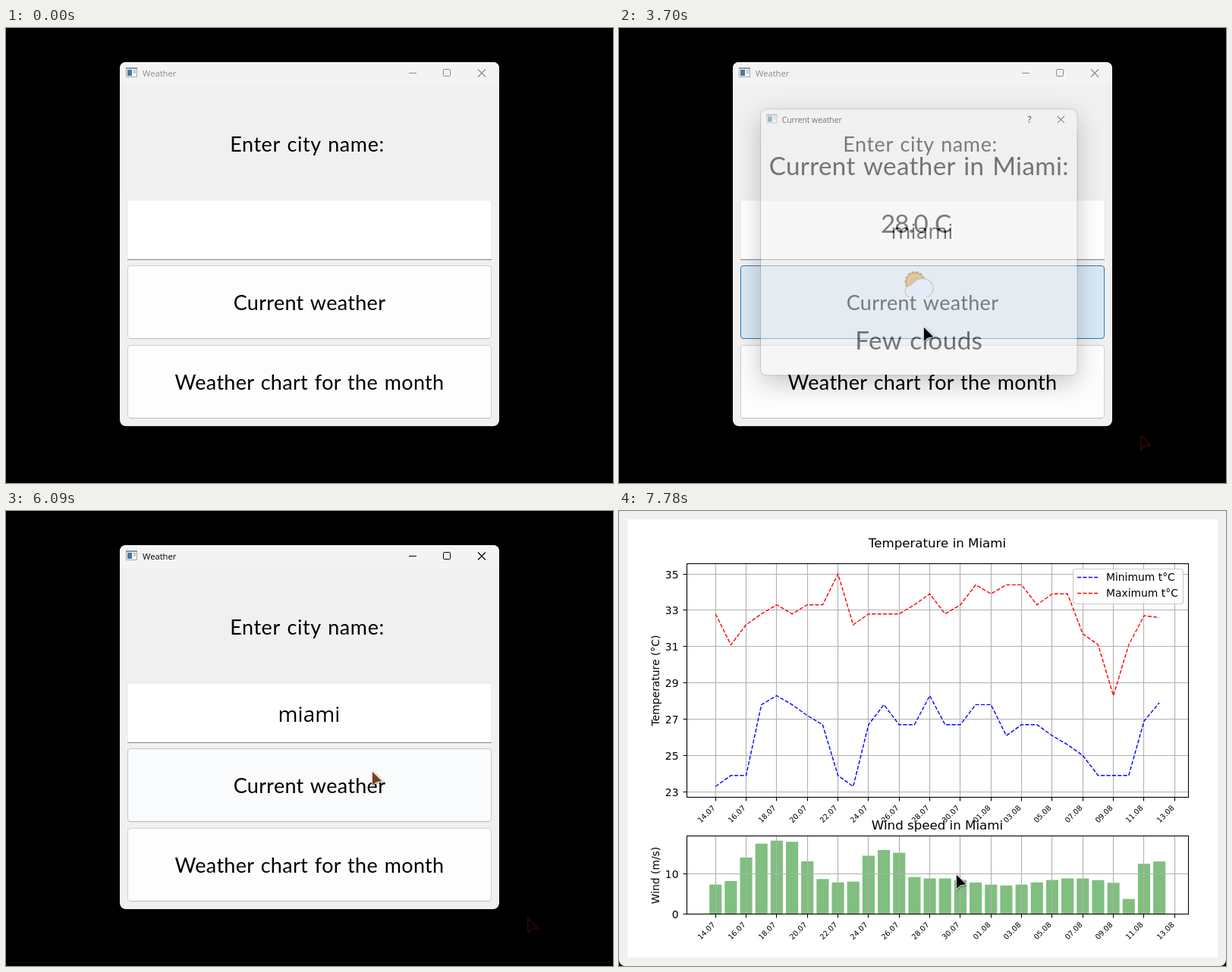
An HTML page for the animation above (8 s loop, 800x600 px).

```html
<!DOCTYPE html>
<html lang="en">
<head>
<meta charset="utf-8">
<title>Weather</title>
<style>
  html, body { margin: 0; width: 100%; height: 100%; overflow: hidden; background: #000; }
  svg { display: block; width: 100%; height: 100%; }
  text { white-space: pre; }
  .ui { font: 11.2px "Open Sans", "Noto Sans", sans-serif; fill: currentColor; }
  .help { font-size: 13px; font-weight: 600; }
  .big { font: 27px Lato, sans-serif; letter-spacing: .011em; word-spacing: .059em; text-anchor: middle; }
  .label { letter-spacing: .022em; }
  .huge { font-size: 36px; }
  .digits { letter-spacing: -.03em; }
  .typed { font: 28px "Open Sans", "Noto Sans", sans-serif; text-anchor: middle; }
  .plot text { font: 13.89px "DejaVu Sans", sans-serif; }
  .plot .head { font-size: 16.67px; text-anchor: middle; }
  .plot .day { font-size: 9.72px; text-anchor: middle; }
  .mid { text-anchor: middle; }
  .end { text-anchor: end; }
  .shadow { filter: drop-shadow(0 12px 18px rgba(0, 0, 0, .42)); }
  #cursor { filter: drop-shadow(1px 1.5px 1.5px rgba(0, 0, 0, .4)); }
</style>
</head>
<body>
<svg id="stage" viewBox="0 0 800 600"></svg>
<script>
const LOOP = 8000, STEP = 70;

// ---------- drawing helpers ----------
const rect = (x, y, w, h, fill, more = '') =>
  `<rect x="${x}" y="${y}" width="${w}" height="${h}" fill="${fill}" ${more}/>`;
const path = (d, stroke, more = '') => `<path d="${d}" fill="none" stroke="${stroke}" ${more}/>`;
const text = (x, y, cls, str, more = '') => `<text x="${x}" y="${y}" class="${cls}" ${more}>${str}</text>`;

function frame(x, y, w, h, title, id, dialog) {
  const r = x + w, cy = y + 14.5;
  const border = dialog
    ? rect(x - .5, y - .5, w + 1, h + 1, 'none', 'rx="8.5" stroke="#000" stroke-opacity=".3"') +
      `<path id="closeBg" d="M${r - 45} ${y}h37a8 8 0 0 1 8 8v21h-45z" fill="#c42b1c"/>` : '';
  const extra = dialog
    ? text(r - 68, y + 19, 'ui mid help', '?')
    : path(`M${r - 119} ${cy}h10`, 'currentColor') +
      rect(r - 73.5, y + 9.5, 9, 9, 'none', 'stroke="currentColor" rx="1"');
  return rect(x, y, w, h, '#f0f0f0', `rx="8" ${dialog ? 'class="shadow"' : ''}`) +
    `<path d="M${x} ${y + 30}v-22a8 8 0 0 1 8-8h${w - 16}a8 8 0 0 1 8 8v22z" fill="#f3f3f3"/>` +
    border + `<g id="${id}Bar">` +
    rect(x + 8.5, y + 7.5, 14, 12, '#f4f6f8', 'stroke="#a3abb2"') +
    rect(x + 8, y + 7, 15, 2, '#8d979f') +
    rect(x + 10, y + 10, 6, 8, '#4a7a9c') + rect(x + 18, y + 10, 3, 5, '#c3c9ce') +
    text(x + 30, y + 19, 'ui', title) + extra +
    path(`M${r - 28} ${cy - 5}l10 10m0 -10l-10 10`, 'currentColor', `id="${id}X" stroke-width="1.1"`) + '</g>';
}

const button = (id, y, label) =>
  rect(160.5, y + .5, 479, 96, '#fdfdfd', `id="${id}" rx="3.5"`) +
  path(`M163 ${y + 96.5}H637`, '#bdbdbd', `id="${id}Edge"`) +
  text(400, y + 58.5, 'big', label);

const mainWindow = () =>
  frame(150, 45, 500, 480, 'Weather', 'main') +
  text(397, 163, 'big label', 'Enter city name:') +
  rect(160, 227, 480, 78, '#fff', 'stroke="#e4e4e4" stroke-width=".8"') +
  path('M160 305.5H640', '#868686') +
  rect(159, 304.4, 482, 1.6, '#2a6496', 'id="focus"') +
  text(399.5, 278, 'typed', '', 'id="typed"') +
  button('now', 313, 'Current weather') +
  button('month', 418, 'Weather chart for the month');

function weatherIcon() {
  let rays = '';
  for (let a = 0; a < 14; a++) {
    rays += `<circle cx="12" r="2.9" transform="translate(394.5 341.5) rotate(${a * 360 / 14})"/>`;
  }
  const cloud = 'M386 363.5C379 361 378 350 385.5 347.5C389 347 390 345 393 342' +
    'C398 337 407 336 413 339C421 343 423 355 416 361Q414 363 411 363.5';
  return `<g fill="#b97a33">${rays}</g><circle cx="394.5" cy="341.5" r="12" fill="#e6a340"/>` +
    path('M385 345a10 10 0 0 1 17 -9', '#f0b95f', 'stroke-width="2"') +
    `<path d="${cloud}" fill="#f1eff8" stroke="#a3a1a6" stroke-width="1.1"/>`;
}

const dialogWindow = () =>
  frame(174, 95, 452, 380, 'Current weather', 'dlg', true) +
  text(400, 189.5, 'big huge', 'Current weather in Miami:') +
  text(395.5, 272, 'big huge digits', '28.0 C') + weatherIcon() +
  text(400, 439, 'big huge', 'Few clouds');

// ---------- chart ----------
// One value per day
const high = [32.8, 31.1, 32.2, 32.8, 33.3, 32.8, 33.3, 33.3, 35, 32.2, 32.8, 32.8, 32.8, 33.3, 33.9,
  32.8, 33.3, 34.4, 33.9, 34.4, 34.4, 33.3, 33.9, 33.9, 31.7, 31.1, 28.3, 31.1, 32.7, 32.6];
const low = [23.3, 23.9, 23.9, 27.8, 28.3, 27.8, 27.2, 26.7, 23.9, 23.3, 26.7, 27.8, 26.7, 26.7, 28.3,
  26.7, 26.7, 27.8, 27.8, 26.1, 26.7, 26.7, 26.1, 25.6, 25, 23.9, 23.9, 23.9, 26.9, 27.9];

// Light breeze with three windy spells and one calm day
function windAt(day) {
  const spell = (mid, width, gain) => gain * Math.exp(-(((day - mid) / width) ** 4));
  return 8 + .9 * Math.cos((day - 14.5) * .7) +
    spell(3.8, 2.3, 9.8) + spell(11, 1.6, 8.6) + spell(27, .7, -3.8) + spell(28.6, 1.2, 5.8);
}

const dayX = i => 127.2 + i * 20.17;
const tempY = v => 83 + (35 - v) * 23.95;
const windY = v => 531.5 - v * 5.31;
const crisp = v => Math.floor(v) + .5;
const pad = n => String(n).padStart(2, '0');

function axes(top, bottom, yTicks, yOf) {
  let grid = '', ticks = '', labels = '';
  for (let i = 0; i <= 30; i += 2) {
    const x = crisp(dayX(i)), d = 14 + i;
    const day = d > 31 ? pad(d - 31) + '.08' : d + '.07';
    grid += `M${x} ${top}V${bottom}`;
    ticks += `M${x} ${bottom}v5`;
    labels += text(0, 3.5, 'day', day, `transform="translate(${x - 12.5} ${bottom + 22}) rotate(-45)"`);
  }
  for (const v of yTicks) {
    const y = crisp(yOf(v));
    grid += `M89.5 ${y}H750`;
    ticks += `M89.5 ${y}h-5`;
    labels += text(78.5, y + 5, 'end', v);
  }
  return path(grid, '#b0b0b0', 'stroke-width="1.1"') + path(ticks, '#000', 'stroke-width="1.1"') + labels;
}

const spines = (top, bottom) =>
  rect(89.5, top, 661, bottom - top, 'none', 'stroke="#000" stroke-width="1.1"');
const dash = 'stroke-width="1.39" stroke-dasharray="5.14 2.22"';
const line = (data, color) =>
  path('M' + data.map((v, i) => dayX(i).toFixed(1) + ' ' + tempY(v).toFixed(1)).join('L'), color, dash);
const side = (y, str) => text(0, 0, 'mid', str, `transform="translate(52.5 ${y}) rotate(-90)"`);
const legend = (y, color, str) => path(`M604 ${y}h28`, color, dash) + text(642, y + 4.5, '', str);

function chartWindow() {
  const bars = high.map((_, i) => {
    const v = windAt(i);
    return rect(dayX(i) - 8.07, windY(v), 16.14, v * 5.31, '#80bf80');
  }).join('');
  return frame(0, -30, 800, 630, 'Weather chart', 'chart') +
    rect(11, 11, 778, 578, '#fff') + '<g class="plot">' +
    axes(69.5, 377.5, [23, 25, 27, 29, 31, 33, 35], tempY) +
    line(low, '#00f') + line(high, '#f00') + spines(69.5, 377.5) +
    text(419.5, 48, 'head', 'Temperature in Miami') + side(223.5, 'Temperature (°C)') +
    rect(598.5, 76.5, 145, 46, '#fff', 'rx="3" fill-opacity=".8" stroke="#ccc" stroke-width="1.2"') +
    legend(87.5, '#00f', 'Minimum t°C') + legend(108.5, '#f00', 'Maximum t°C') +
    bars + axes(428.5, 531.5, [0, 10], windY) + spines(428.5, 531.5) +
    text(419.5, 420, 'head', 'Wind speed in Miami') + side(480.5, 'Wind (m/s)') + '</g>';
}

const arrow = 'M.8 .8V19L6 14.5L13.3 13.3Z';
const stage = document.getElementById('stage');
stage.innerHTML = rect(0, 0, 800, 600, '#000') +
  path(arrow, '#300a05', 'id="trace" transform="translate(687 537)" stroke-width="1.5"') +
  `<g id="main">${mainWindow()}</g>` +
  `<g id="dlg">${dialogWindow()}</g>` +
  `<g id="chart">${chartWindow()}</g>` +
  path(arrow, '#fff', 'id="cursor" stroke-width="1.6" stroke-linejoin="round" paint-order="stroke"');

const el = {};
stage.querySelectorAll('[id]').forEach(n => el[n.id] = n);
const set = (id, attrs) => { for (const k in attrs) el[id].setAttribute(k, attrs[k]); };
const show = (id, yes) => set(id, { visibility: yes ? 'visible' : 'hidden' });

// ---------- motion ----------
// Progress 0..1 in steps; the first step already shows at a, the last at b
function ramp(t, a, b) {
  const p = (Math.floor((t - a) / STEP + .15) + 1) * STEP / (b - a + STEP);
  return Math.max(0, Math.min(1, p));
}

// Pointer moves: start, end, x, y
const moves = [[120, 680, 428, 258], [880, 1430, 409, 215], [2750, 3290, 401, 394],
  [4510, 4930, 607, 75], [5070, 5210, 606, 96], [5680, 6370, 444, 479]];

function pointer(t) {
  let x = 732, y = 572;
  for (const [a, b, toX, toY] of moves) {
    const p = ramp(t, a, b);
    x += (toX - x) * (1 - (1 - p) ** 1.4);
    y += (toY - y) * p;
  }
  return `translate(${x} ${y})`;
}

// Window opening: fades in early while it grows
function pose(id, p, cx, cy) {
  const s = 1 - .107 * (1 - p) ** 1.4;
  show(id, p > 0);
  set(id, {
    opacity: Math.sin(Math.min(Math.PI / 2, 2.7 * p)),
    transform: `translate(${cx} ${cy}) scale(${s}) translate(${-cx} ${-cy})`
  });
}

const mix = (a, b, p) => `rgb(${[0, 1, 2].map(i => Math.round(a[i] + (b[i] - a[i]) * p))})`;
const gray = v => [v, v, v];

function tint(id, p) {
  const edge = [42, 122, 184];
  set(id, { fill: mix(gray(253), [217, 232, 245], p), stroke: mix(gray(208), edge, p) });
  set(id + 'Edge', { stroke: mix(gray(189), edge, p) });
}

function draw(t) {
  const on = (a, b) => t >= a && t < b;
  const passing = on(6085, 6155);

  set('mainBar', { color: on(880, 3700) || on(5680, 7510) ? '#000' : '#8a8a8a' });
  show('focus', on(880, 3400));
  el.typed.textContent = 'miami'.slice(0, [1760, 1830, 1960, 1960, 2160].filter(a => t >= a).length);
  tint('now', ramp(t, 3110, 3290) - ramp(t, 3770, 3980) + .1 * passing);
  tint('month', .6 * ramp(t, 6230, 6370) + .4 * on(6840, 7040));

  pose('dlg', ramp(t, 3700, 3980) - ramp(t, 5680, 5890), 340, 252);
  const red = .9 * ramp(t, 5140, 5280) + .03 * on(4790, 5140);
  set('closeBg', { opacity: red });
  set('dlgX', { stroke: red > .5 ? '#fff' : '#000' });
  pose('chart', ramp(t, 7510, 7780), 342, 265);

  set('cursor', { transform: pointer(t), fill: passing ? '#7a3f1c' : '#000' });
  show('cursor', t >= 120);
  show('trace', t >= 190);
}

const start = performance.now();
function tick() {
  draw((performance.now() - start) % LOOP);
  requestAnimationFrame(tick);
}
tick();
</script>
</body>
</html>
```
